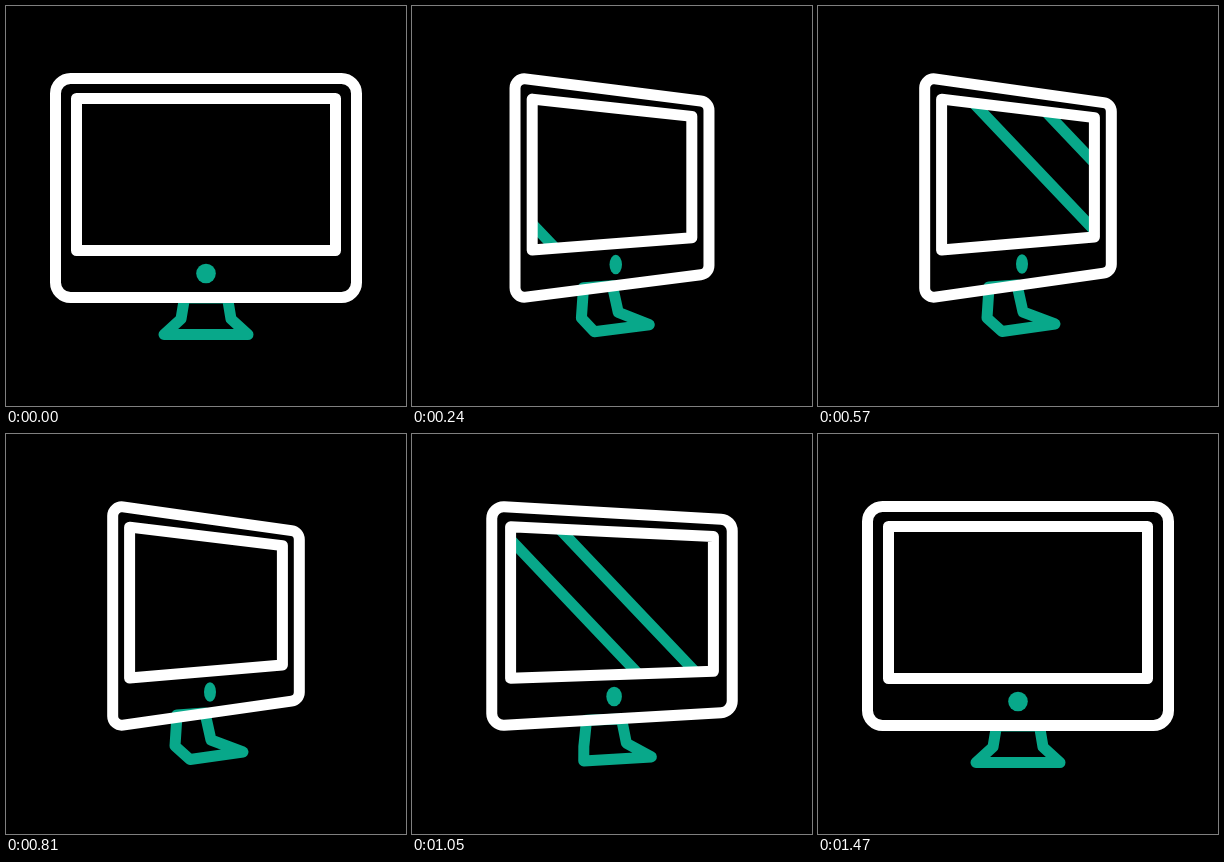
Write an HTML page with a canvas that moves like this. It is 400x400 px and loops after 3620 ms.

```html
<!DOCTYPE html>
<html>
<head>
<meta charset="utf-8">
<style>
html, body { margin: 0; width: 100%; height: 100%; overflow: hidden; background: #000; }
canvas { display: block; width: 100vw; height: 100vh; }
</style>
</head>
<body>
<canvas id="stage" width="400" height="400"></canvas>
<script>
const ctx = document.getElementById('stage').getContext('2d');
const LOOP = 3620, STEP = 30, MID = 200, HORIZON = 181.5;
const GREEN = '#08a88a', WHITE = '#fff';

const mix = (a, b, k) => a + (b - a) * k;
const clamp = x => Math.min(1, Math.max(0, x));
const ease = x => 0.5 - Math.cos(Math.PI * clamp(x)) / 2;

// Point of the panel dx from its middle: the far (right) side shrinks to the horizon
function panelPoint(dx, y, squeeze, turn) {
  const scale = mix(1, 0.889 - 0.0008 * dx, turn);
  return [MID + dx * mix(1, squeeze, turn), HORIZON + (y - HORIZON) * scale];
}

function panel(half, top, bottom, squeeze, turn) {
  return [[-half, top], [half, top], [half, bottom], [-half, bottom]]
    .map(([dx, y]) => panelPoint(dx, y, squeeze, turn));
}

// The foot is symmetric from the front: left half, then its mirror
const FOOT_LEFT = [[178.5, 292], [175, 313], [158, 328.5]];
const FOOT_FRONT = [...FOOT_LEFT, ...FOOT_LEFT.map(([x, y]) => [2 * MID - x, y]).reverse()];
const FOOT_SIDE = [[171, 281], [169, 312], [184, 325.5], [237, 318], [205, 306], [199, 279]];

const foot = turn => FOOT_FRONT.map((p, i) => p.map((v, axis) => mix(v, FOOT_SIDE[i][axis], turn)));

function shape(points, radius = 0) {
  const n = points.length, [a, b] = points;
  const path = new Path2D();
  path.moveTo((a[0] + b[0]) / 2, (a[1] + b[1]) / 2);
  for (let i = 1; i <= n; i++) {
    path.arcTo(...points[i % n], ...points[(i + 1) % n], radius);
  }
  path.closePath();
  return path;
}

function stroke(path, color) {
  ctx.strokeStyle = color;
  ctx.stroke(path);
}

// Two diagonal glints, clipped to the screen; mid is x - y of their middle at y = 160
function glints(mid, gap, clip) {
  ctx.save();
  ctx.clip(clip);
  for (const side of [-1, 1]) {
    const x = 160 + mid + side * gap / 2;
    const line = new Path2D();
    line.moveTo(x - 95, 60);
    line.lineTo(x + 95, 260);
    stroke(line, GREEN);
  }
  ctx.restore();
}

function sweep(t, start, from, to) {
  const u = (t - start) / 660;
  return u > 0 && u < 1 ? mix(from, to, u + 0.3 * u * (1 - u)) : null;
}

function draw(t) {
  const turn = ease((t - 14) / 270) - ease((t - 920) / 270);
  const screen = shape(panel(129.5, 92.5, 244.5, 0.59, turn));
  const body = shape(panel(150.5, 72.5, 291.5, 0.62, turn), mix(15, 9, turn));
  const mid = sweep(t, 150, -195, 205) ?? sweep(t, 810, -185, 288);

  ctx.fillStyle = '#000';
  ctx.fillRect(0, 0, 400, 400);
  ctx.lineWidth = 11;
  ctx.lineJoin = ctx.lineCap = 'round';

  stroke(shape(foot(turn)), GREEN);
  if (mid !== null) glints(mid, 57 + 7 * turn * turn, screen);
  stroke(body, WHITE);
  stroke(screen, WHITE);

  const [x, y] = panelPoint(0, 267.5, 1, turn);
  ctx.fillStyle = GREEN;
  ctx.beginPath();
  ctx.ellipse(x + 4 * turn, y, mix(9.8, 6, turn), 9.8, 0, 0, 7);
  ctx.fill();
}

const began = performance.now();
function frame() {
  const t = (performance.now() - began) % LOOP;
  draw(Math.floor(t / STEP) * STEP);
  requestAnimationFrame(frame);
}
frame();
</script>
</body>
</html>
```
